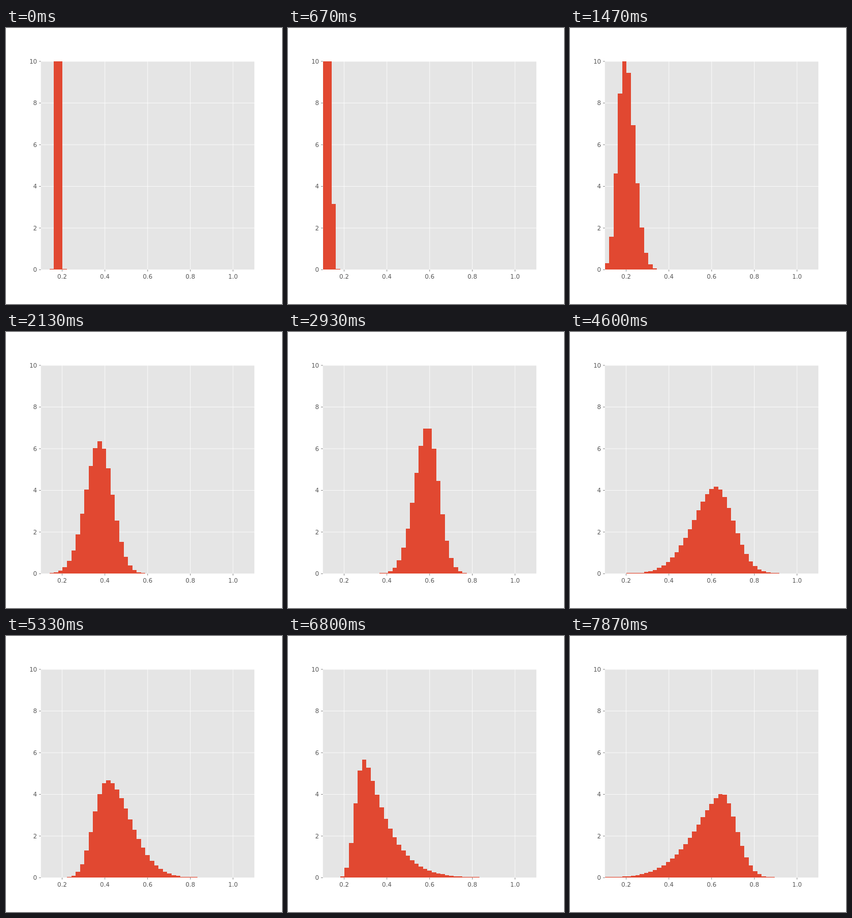
An HTML page for the animation above (8000 ms loop, 480 by 480 pixels).

```html
<!DOCTYPE html>
<html lang="en">
<head>
<meta charset="utf-8">
<title>Histogram</title>
<style>
  html, body { margin: 0; width: 100%; height: 100%; overflow: hidden; background: #fff; }
  svg { display: block; width: 100vw; height: 100vh; }
  text { font: 10.5px "DejaVu Sans", sans-serif; fill: #555; }
</style>
</head>
<body>
<svg id="stage" viewBox="0 0 480 480">
  <rect width="480" height="480" fill="#fff"/>
  <rect x="60.7" y="58" width="371.3" height="362.4" fill="#e5e5e5"/>
  <g id="axes"></g>
  <path id="bars" fill="#e14831" shape-rendering="crispEdges"/>
</svg>
<script>
const LOOP = 8000, TICK = 1000 / 15, BINS = 49, SUB = 8;
const LEFT = 60.5, RIGHT = 432, TOP = 58, BASE = 420.4;
const binX = k => LEFT + k * (RIGHT - LEFT) / BINS;
const valueY = v => Math.max(TOP, BASE - v * (BASE - TOP) / 10);

// The hump over time: tick, mode, left spread, right spread (in bins)
const KEYS = [
  [0, 4.02, .45, .45],
  [10, 1.01, .91, .91],
  [20, 3.3, 1.9, 2.7],
  [32, 13.5, 4.5, 4.16],
  [44, 24, 4.1, 3.65],
  [56, 32.4, 3.5, 3.8],
  [68, 25.5, 7.5, 5.7],
  [80, 15.5, 4.5, 7.3],
  [92, 9, 2.1, 3.9],
  [101, 9.7, 2.94, 6.4],
  [110, 16.5, 6.5, 9],
  [118, 27, 8.95, 4.55]
];

// Cubic through the keys
function shapeAt(t) {
  const last = KEYS.length - 1;
  let i = 0;
  while (i < last - 1 && KEYS[i + 1][0] <= t) i++;
  const a = KEYS[i], b = KEYS[i + 1];
  const before = KEYS[Math.max(0, i - 1)], after = KEYS[Math.min(last, i + 2)];
  const span = b[0] - a[0], u = Math.min(1, (t - a[0]) / span);
  const slope = (p, q, j) => (q[j] - p[j]) / (q[0] - p[0]) * span;
  return [1, 2, 3].map(j => {
    const m0 = slope(before, b, j), m1 = slope(a, after, j), d = b[j] - a[j];
    return a[j] + u * (m0 + u * (3 * d - 2 * m0 - m1 + u * (m0 + m1 - 2 * d)));
  });
}

// Ten pictures a second on a 15 Hz clock: every third tick repeats
function pose(ms) {
  const tick = Math.floor((ms % LOOP + 6) / TICK);
  return tick % 3 ? tick : Math.max(0, tick - 1);
}

// Two-sided bell; the skew sets how steep each side is
function heights(t) {
  const [mode, left, right] = shapeAt(t);
  const skew = right / left;
  const pL = 2 * skew ** .35, pR = Math.max(1.15, 2 - .55 * (skew - 1) ** 2);
  const side = x => x < mode ? [(mode - x) / left, pL] : [(x - mode) / right, pR];
  const sums = Array.from({ length: BINS }, (_, k) => {
    let sum = 0;
    for (let i = 0; i < SUB; i++) {
      const [z, p] = side(k + (i + .5) / SUB);
      sum += Math.exp(-(z ** p));
    }
    return sum;
  });
  const total = sums.reduce((a, b) => a + b);
  return sums.map((s, k) => {
    const [z, p] = side(k + .5), h = s * BINS / total;
    return z < 5 / p ? Math.max(h, .03) : h < .015 ? 0 : h;
  });
}

function drawAxes() {
  const line = (x1, y1, x2, y2, color) =>
    `<line x1="${x1}" y1="${y1}" x2="${x2}" y2="${y2}" stroke="${color}" stroke-width=".75"/>`;
  const label = (x, y, anchor, s) => `<text x="${x}" y="${y}" text-anchor="${anchor}">${s}</text>`;
  let out = "";
  for (let v = 0; v <= 10; v += 2) {
    const y = valueY(v);
    out += line(LEFT, y, RIGHT, y, "#fff") + line(57.6, y, LEFT, y, "#555")
      + label(54, y + 3.9, "end", v);
  }
  for (let i = 1; i <= 5; i++) {
    const v = i / 5, x = LEFT + (v - .1) * (RIGHT - LEFT);
    out += line(x, TOP, x, BASE, "#fff") + line(x, BASE, x, BASE + 3, "#555")
      + label(x, 435.7, "middle", v.toFixed(1));
  }
  document.getElementById("axes").innerHTML = out;
}

const bars = document.getElementById("bars");
let shown = -1;
function render(ms) {
  const t = pose(ms);
  if (t === shown) return;
  shown = t;
  let d = `M${LEFT} ${BASE}`;
  heights(t).forEach((h, k) => {
    const y = valueY(h).toFixed(2);
    d += `L${binX(k).toFixed(2)} ${y}L${binX(k + 1).toFixed(2)} ${y}`;
  });
  bars.setAttribute("d", d + `L${RIGHT} ${BASE}Z`);
}

drawAxes();
render(0);
const start = performance.now();
(function frame() {
  render(performance.now() - start);
  requestAnimationFrame(frame);
})();
</script>
</body>
</html>
```
